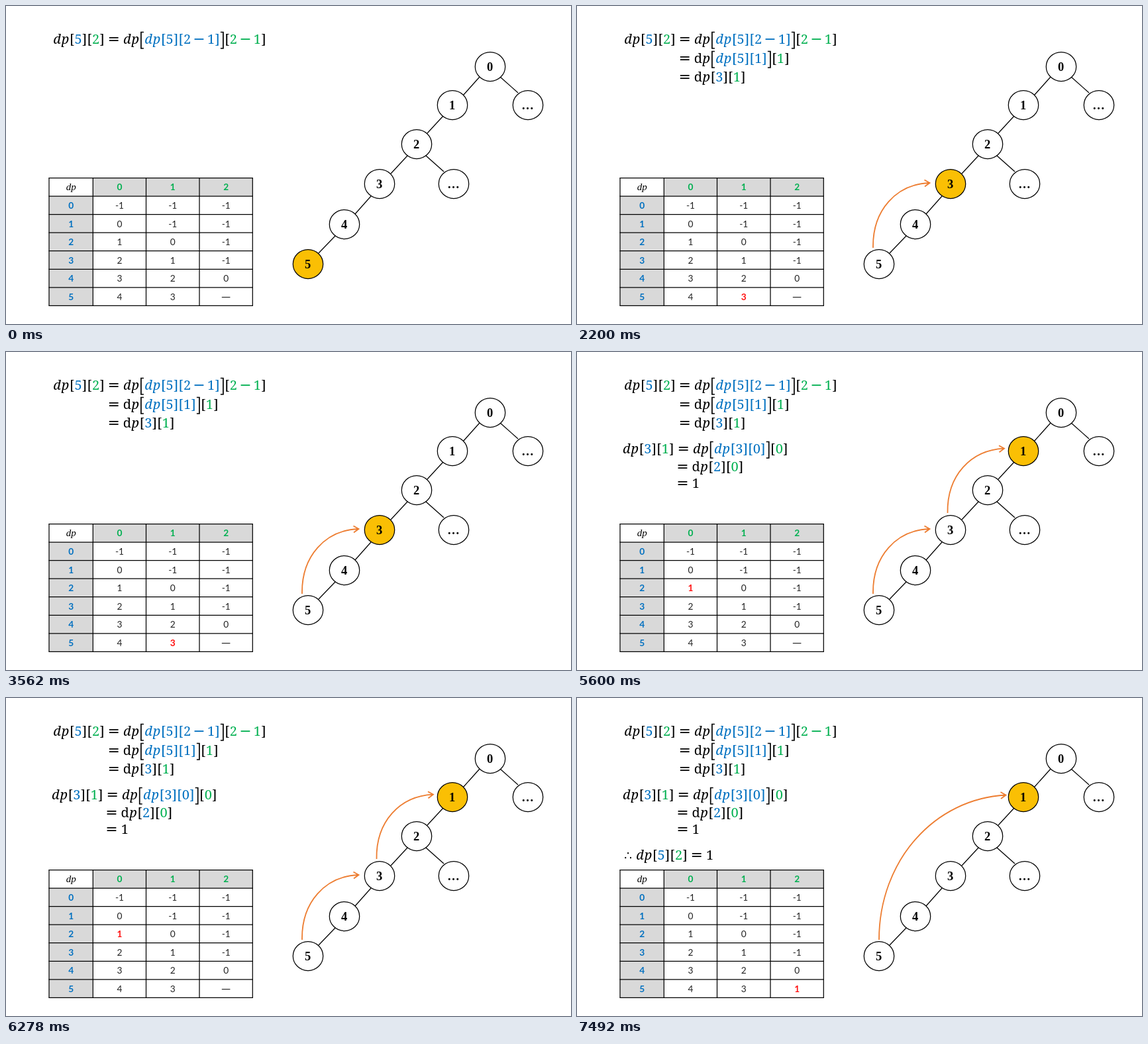
An HTML page for the animation above (8000 ms loop, 853x480 px).

```html
<!DOCTYPE html>
<html lang="en">
<head>
<meta charset="utf-8">
<title>Binary lifting table</title>
<style>
html, body { margin: 0; width: 100%; height: 100%; overflow: hidden; background: #fff; }
svg { display: block; width: 853px; height: 480px; }
text { text-anchor: middle; }
.math { font: 20px "Noto Serif", serif; }
.math .it { font-style: italic; }
.math .op { font: 22px "DejaVu Sans", sans-serif; }
.math .so { font: 18px "DejaVu Sans", sans-serif; }
.math path { fill: none; stroke: #000; stroke-width: 1.7; }
.cell { font: 13.7px Lato, sans-serif; fill: #222; }
.bold { font-weight: 700; }
.name { font: italic 15px "Liberation Serif", serif; }
.node { font: bold 18.5px "Liberation Serif", serif; }
.line { fill: none; stroke: #000; stroke-width: 1.25; }
.arrow { fill: none; stroke: #ed7d31; stroke-width: 1.8; }
</style>
</head>
<body>
<svg id="stage" viewBox="0 0 853 480"></svg>
<script>
const BLUE = '#0070c0', GREEN = '#00b050', RED = '#ff1010', GOLD = '#fabf04';
const LOOP = 8000;
const stage = document.getElementById('stage');

function el(tag, attrs, parent = stage, text) {
  const e = document.createElementNS('http://www.w3.org/2000/svg', tag);
  for (const k in attrs) e.setAttribute(k, attrs[k]);
  if (text !== undefined) e.textContent = text;
  parent.append(e);
  return e;
}

// Formulas: B, G, K switch colour; ( ) are tall brackets; D is an upright d.
const INK = { B: BLUE, G: GREEN, K: '#000' };
const WIDTH = { d: 12.2, D: 12.2, p: 12.6, '[': 7.4, ']': 7.4, '(': 7.4, ')': 7.4, '=': 28, '-': 24.3, '∴': 18 };
const GLYPH = { D: 'd', '-': '−' };
const KIND = { d: 'it', p: 'it', '=': 'op', '-': 'op', '∴': 'so' };

function formula(x, y, src) {
  const g = el('g', { class: 'math' });
  let fill = INK.K;
  for (const c of src) {
    if (INK[c]) { fill = INK[c]; continue; }
    const w = WIDTH[c] || 11.7, mid = x + w / 2;
    if (c === '(' || c === ')') {
      const s = c === '(' ? 1 : -1;
      el('path', { d: `M${mid + 2.6 * s} ${y - 17.5}h${-4 * s}v24.5h${4 * s}` }, g);
    } else {
      el('text', { x: c === '∴' ? x + 6 : mid, y, fill, class: KIND[c] || '' }, g, GLYPH[c] || c);
    }
    x += w;
  }
  return g;
}

// Table
const COLS = [65, 131.3, 211.5, 292, 372.3];
const rowY = r => 259.5 + 27.55 * r;
const colMid = c => (COLS[c] + COLS[c + 1]) / 2;
const ROWS = [[-1, -1, -1], [0, -1, -1], [1, 0, -1], [2, 1, -1], [3, 2, 0], [4, 3, '—']];

function cell(c, r, text, cls = 'cell', fill) {
  const t = el('text', { x: colMid(c), y: rowY(r) + 18.9, class: cls }, stage, text);
  if (fill) t.style.fill = fill;
  return t;
}

el('rect', { x: COLS[1], y: rowY(0), width: COLS[4] - COLS[1], height: 27.55, fill: '#d9d9d9' });
el('rect', { x: COLS[0], y: rowY(1), width: COLS[1] - COLS[0], height: 27.55 * 6, fill: '#d9d9d9' });
for (let r = 0; r < 8; r++) el('path', { class: 'line', d: `M${COLS[0] - .6} ${rowY(r)}H${COLS[4] + .6}` });
for (const x of COLS) el('path', { class: 'line', d: `M${x} ${rowY(0)}V${rowY(7)}` });

cell(0, 0, 'dp', 'name');
for (let c = 0; c < 3; c++) cell(c + 1, 0, c, 'cell bold', GREEN);
const cells = ROWS.map((row, r) => {
  cell(0, r + 1, r, 'cell bold', BLUE);
  return row.map((v, c) => cell(c + 1, r + 1, v));
});
const answer = cells[5][2];

// Tree
const EDGES = [
  [715, 107, 690, 135], [746, 107, 773, 131], [660, 166, 636, 192], [634, 226, 661, 250],
  [606, 226, 581, 253], [551, 287, 527, 314], [497, 347, 472, 373]
];
const NODES = [
  [731, 91.5], [674, 149.5], [620, 208.5], [564, 268.5], [511, 329.5], [456, 389.5],
  [788, 149.5], [676, 268.5]
];
for (const [a, b, c, d] of EDGES) el('path', { class: 'line', d: `M${a} ${b}L${c} ${d}` });
const discs = NODES.map(([cx, cy], i) => {
  const disc = el('ellipse', { class: 'line', cx, cy, rx: 22.7, ry: 22 });
  el('text', { class: 'node', x: cx - .4, y: cy + 6, }, stage, i < 6 ? i : '…');
  return disc;
});

function arrow(curve, x, y) {
  return el('path', { class: 'arrow', d: `${curve} ${x} ${y}M${x - 8} ${y - 4.5}L${x} ${y}L${x - 7.5} ${y + 5.5}` });
}
const hop = arrow('M447 365C446 308 482 269', 532.5, 267);
const hop2 = arrow('M559.5 243C558.5 187 594 148', 645, 145.7);
const jump = arrow('M456 365C456 245 540 152', 647.5, 146.5);

// Each formula with the step at which it appears
const lines = [
  [0, formula(71, 57, 'dp[B5K][G2K]=dp(Bdp[5][2-1]K)[G2-1K]')],
  [1, formula(148.8, 86, '=Dp(Bdp[5][1]K)[G1K]')],
  [2, formula(148.8, 114, '=Dp[B3K][G1K]')],
  [3, formula(68.8, 153, 'dp[B3K][G1K]=dp(Bdp[3][0]K)[G0K]')],
  [4, formula(145.5, 180, '=Dp[B2K][G0K]')],
  [4, formula(145.5, 205, '=1')],
  [5, formula(71, 244, '∴dp[B5K][G2K]=1')]
];

// Start time, highlighted node, red cell, visible arrows
const STEPS = [
  { at: 0, node: 5, arrows: [] },
  { at: 1070, node: 5, red: [5, 1], arrows: [] },
  { at: 2200, node: 3, red: [5, 1], arrows: [hop] },
  { at: 4470, node: 3, red: [3, 0], arrows: [hop] },
  { at: 5600, node: 1, red: [2, 0], arrows: [hop, hop2] },
  { at: 6730, node: 1, red: [5, 2], arrows: [jump] }
];

const show = (e, on) => { e.style.display = on ? '' : 'none'; };

function render(n) {
  const { node, red, arrows } = STEPS[n];
  for (const [from, g] of lines) show(g, n >= from);
  for (const a of [hop, hop2, jump]) show(a, arrows.includes(a));
  discs.forEach((d, i) => { d.style.fill = i === node ? GOLD : '#fff'; });
  cells.forEach((row, r) => row.forEach((t, c) => {
    const on = red && red[0] === r && red[1] === c;
    t.style.fill = on ? RED : '';
    t.style.fontWeight = on ? 700 : '';
  }));
  const done = n === STEPS.length - 1;
  answer.textContent = done ? '1' : '—';
  answer.style.fontFamily = done ? '' : '"Noto Sans", sans-serif';
}

let current = -1;
function tick() {
  const t = performance.now() % LOOP;
  const n = STEPS.filter(s => s.at <= t).length - 1;
  if (n !== current) render(current = n);
  requestAnimationFrame(tick);
}
tick();
</script>
</body>
</html>
```
